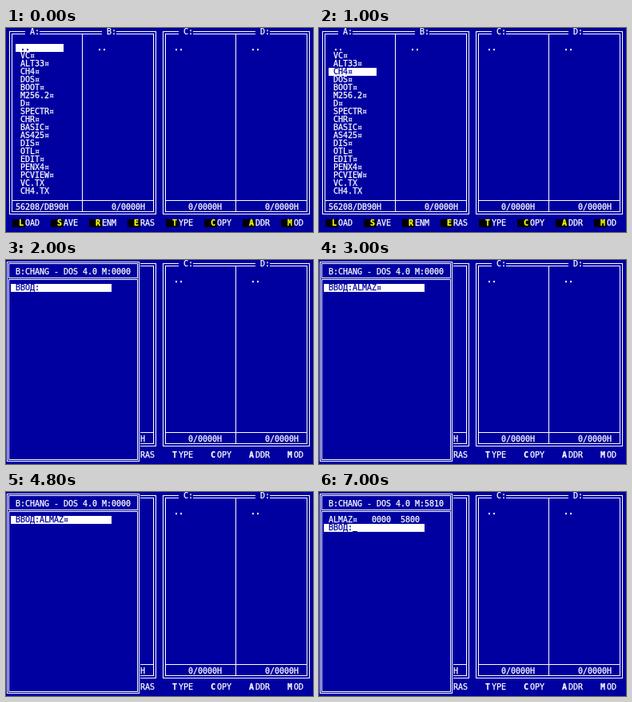
Write an HTML page that moves like this. It is 384 px wide and 256 px high and loops after 8000 ms.

```html
<!DOCTYPE html>
<html lang="en">
<head>
<meta charset="utf-8">
<title>File manager</title>
<style>
html, body { margin: 0; width: 100%; height: 100%; overflow: hidden; background: #0000a0; }
svg { display: block; width: 384px; height: 256px; shape-rendering: crispEdges; --blue: #0000a0; }
text {
  font: 10px "DejaVu Sans Mono", monospace; letter-spacing: -.02px; white-space: pre;
  color: #fff; fill: currentColor; stroke: currentColor; stroke-width: .25px;
}
rect { fill: #fff; }
.line { fill: none; stroke: #fff; }
.blue { fill: var(--blue); color: var(--blue); }
.bold { font-weight: bold; }
.black { fill: #000; }
.yellow { color: #ff0; }

.pick-up, .pick-dir, .keys, .window, .ask, .typed, .done, .cursor { animation: 8s step-end infinite; }
.pick-up { animation-name: pick-up; }
.pick-dir { animation-name: pick-dir; }
.keys { animation-name: keys; }
.window { animation-name: window; }
.ask { animation-name: ask; }
.typed { animation-name: typed; }
.done { animation-name: done; }
.cursor { animation-name: cursor; }
@keyframes pick-up { 0% { visibility: visible } 12.5%, 100% { visibility: hidden } }
@keyframes pick-dir { 0%, 25%, 100% { visibility: hidden } 12.5% { visibility: visible } }
@keyframes keys { 0% { visibility: visible } 25%, 100% { visibility: hidden } }
@keyframes window { 0% { visibility: hidden } 25%, 100% { visibility: visible } }
@keyframes ask { 0%, 75%, 100% { visibility: hidden } 25% { visibility: visible } }
@keyframes typed { 0%, 75%, 100% { visibility: hidden } 37.5% { visibility: visible } }
@keyframes done { 0% { visibility: hidden } 75%, 100% { visibility: visible } }
@keyframes cursor { 0% { visibility: hidden } 87.5%, 100% { visibility: visible } }
</style>
</head>
<body>
<svg id="screen" viewBox="0 0 384 256"></svg>
<script>
const files = ['VC¤', 'ALT33¤', 'CH4¤', 'DOS¤', 'BOOT¤', 'M256.2¤', 'D¤', 'SPECTR¤', 'CHR¤',
  'BASIC¤', 'AS425¤', 'DIS¤', 'OTL¤', 'EDIT¤', 'PENX4¤', 'PCVIEW¤', 'VC.TX', 'CH4.TX'];
const commands = ['LOAD', 'SAVE', 'RENM', 'ERAS', 'TYPE', 'COPY', 'ADDR', 'MOD'];

// y is the top of a 10px text row
const text = (x, y, s, cls = '') => `<text x="${x}" y="${y + 8}" class="${cls}">${s}</text>`;
const box = (x, y, w, h, cls = '') => `<rect x="${x}" y="${y}" width="${w}" height="${h}" class="${cls}"/>`;
const frame = (x, y, w, h) => box(x + .5, y + .5, w - 1, h - 1, 'line');
const group = (cls, ...parts) => `<g class="${cls}">${parts.join('')}</g>`;
const bar = (x, y, w, s, cls = '') => box(x, y, w, 10) + text(x + 6, y, s, 'blue ' + cls);

function panel(x, drives) {
  const titles = [...drives].map((d, i) => {
    const left = x + i * 96;
    return box(left + 24, 0, 18, 9, 'blue') + text(left + 30, 0, d + ':') +
      text(left + 18, 20, '..', 'bold');
  });
  return frame(x + 4, 4, 184, 230) + frame(x + 7, 7, 178, 224) +
    box(x + 95, 7, 1, 224) + box(x + 7, 216, 178, 1) + titles.join('');
}

const screen = [
  box(0, 0, 384, 256, 'blue'),
  panel(0, 'AB'),
  panel(192, 'CD'),
  ...files.map((name, i) => text(18, 30 + i * 10, name)),
  text(12, 220, '56208/DB90H'),
  ...[132, 228, 324].map(x => text(x, 220, '0/0000H')),
  ...commands.map((name, i) => {
    const x = 8 + i * 48;
    return text(x + 8, 240, name[0], 'bold') + text(x + 16, 240, name.slice(1)) +
      group('keys', box(x, 240, 16, 10, 'black'), text(x + 8, 240, name[0], 'bold yellow'));
  }),
  group('pick-up', bar(12, 20, 60, '..', 'bold')),
  group('pick-dir', bar(12, 50, 60, 'CH4¤')),
  group('window',
    box(0, 0, 168, 256, 'blue'),
    frame(1, 2, 166, 251), frame(3, 4, 162, 19), frame(3, 24, 162, 227),
    text(12, 10, 'B:CHANG - DOS 4.0 M:')),
  group('ask', text(132, 10, '0000'), bar(6, 30, 126, 'ВВОД:')),
  group('typed', text(42, 30, 'ALMAZ¤', 'blue')),
  group('done', text(132, 10, '5810'), text(12, 30, 'ALMAZ¤   0000  5800'), bar(6, 40, 126, 'ВВОД:')),
  group('cursor', box(42, 49, 6, 1, 'blue')),
];
document.getElementById('screen').innerHTML = screen.join('');
</script>
</body>
</html>
```
